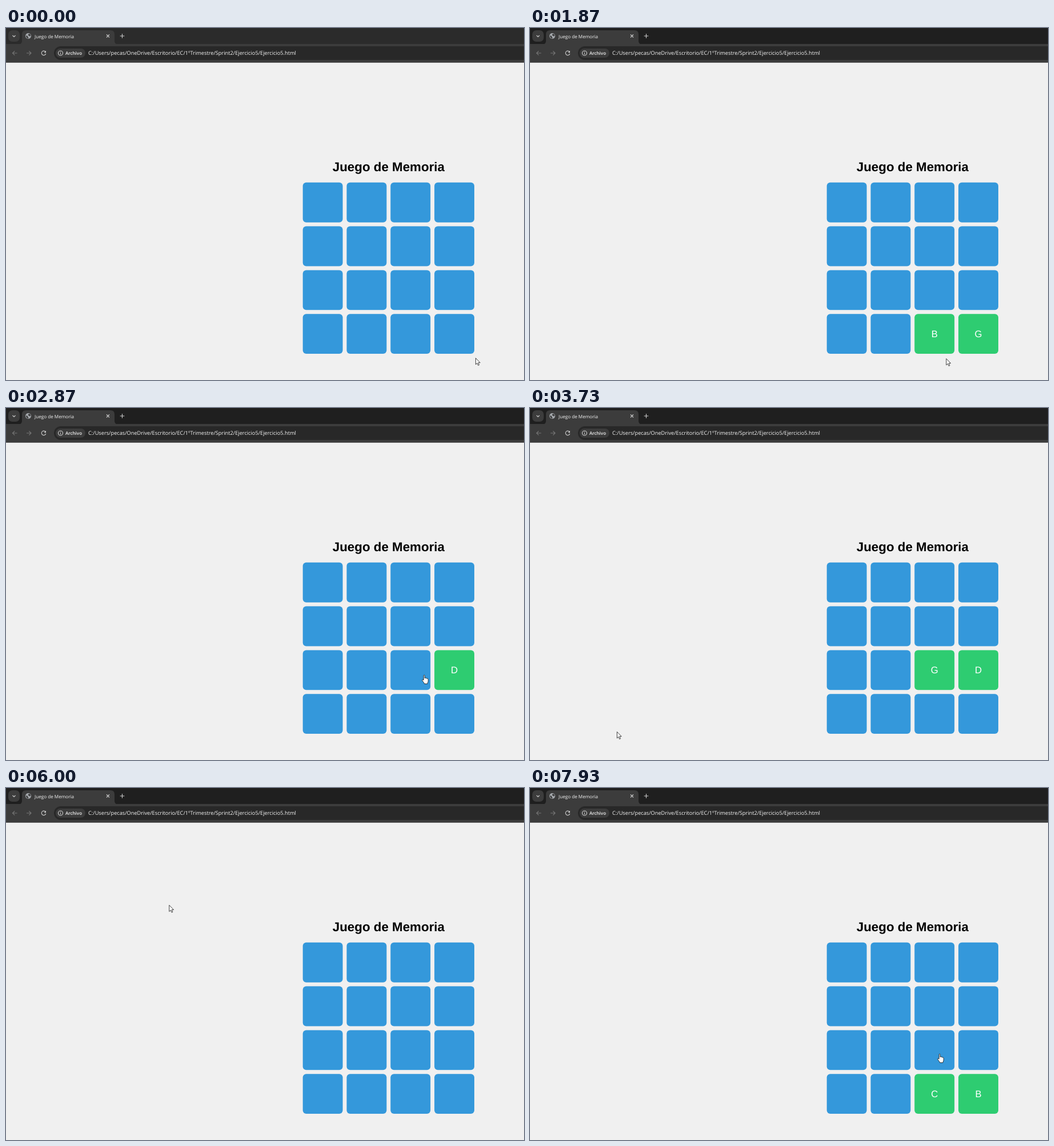
These frames come from a looping animation (907x617 px, 8000 ms). An HTML page:

```html
<!DOCTYPE html>
<html lang="es">
<head>
<meta charset="utf-8">
<title>Juego de Memoria</title>
<style>
  html, body { margin: 0; width: 100%; height: 100%; overflow: hidden; background: #f0f0f0; }
  svg { display: block; width: 907px; height: 617px; text-rendering: geometricPrecision; }
  .ui { font-family: "Open Sans", "Noto Sans", sans-serif; fill: #f4f4f4; }
  .page { font-family: "Liberation Sans", Arial, sans-serif; text-anchor: middle; }
  .line { fill: none; stroke: #d0d0d0; stroke-width: 1.1; }
  .dim { stroke: #777; }
  .pointer { fill: #fff; stroke: #111; stroke-width: .8; stroke-linejoin: round; }
</style>
</head>
<body>
<svg viewBox="0 0 907 617">
  <rect width="907" height="617" fill="#f0f0f0"/>

  <!-- tab strip -->
  <rect id="strip" width="907" height="29" fill="#1f1f1f"/>
  <rect x="4" y="4" width="20" height="20" rx="7" fill="#3c3c3c"/>
  <path class="line" d="M11.5 13l2.5 2.5 2.5-2.5"/>
  <path fill="#3c3c3c" d="M22 28.5q6 0 6-6V11q0-7 7-7H183q7 0 7 7v11.5q0 6 6 6z"/>
  <circle cx="39" cy="14" r="5" fill="#a4a8ac"/>
  <path fill="#3c3c3c" d="M35 13l3.2 1.5.3 1.800 1 1-.6 1.200q-4-1-3.900-5.500zM39.500 10.200l2.500.3 1.300 2.500-1.400 1.700-1.600-1.300-1.700-.5z"/>
  <text class="ui" x="50" y="17.5" font-size="8.150">Juego de Memoria</text>
  <path class="line" d="M176 11.500l5 5m0-5l-5 5M203.500 10.200v7.600M199.700 14h7.600"/>

  <!-- toolbar -->
  <rect y="28" width="907" height="32.8" fill="#3c3c3c"/>
  <path class="line dim" d="M19.500 44h-8m3.700-3.700L11.500 44l3.700 3.700M36 44h8m-3.700-3.700L44 44l-3.700 3.700"/>
  <circle id="hover" cx="66" cy="44" r="12" fill="#505050"/>
  <circle id="ripple" cx="64" cy="48" fill="#fff" opacity=".15"/>
  <path class="line" d="M69 41.500A3.800 3.800 0 1 0 69.700 45"/>
  <path fill="#d0d0d0" d="M70 39.700v3.600h-3.600z"/>
  <rect x="84" y="32" width="840" height="24" rx="12" fill="#282828"/>
  <rect x="87" y="36" width="52" height="16" rx="8" fill="#3c3c3c"/>
  <circle class="line" cx="95.500" cy="44" r="4"/>
  <path class="line" d="M95.500 43.500v2.800M95.500 41.500v1.100"/>
  <text class="ui" x="104" y="47" font-size="8" font-weight="600">Archivo</text>
  <text class="ui" x="144" y="47.300" font-size="9.230">C:/Users/pecas/OneDrive/Escritorio/EC/1ºTrimestre/Sprint2/Ejercicio5/Ejercicio5.html</text>

  <!-- game -->
  <text class="page" x="669.900" y="251.300" font-size="22.350" font-weight="700">Juego de Memoria</text>
  <g id="board" class="page" font-size="16.750"></g>

  <path id="arrow" class="pointer" d="M.4 .6V11.800L3 9.400l1.700 4 1.800-.8-1.700-3.900h3.400z"/>
  <g id="hand">
    <path class="pointer" transform="translate(-5 -.5)"
      d="M3.200 9.600V1.700C3.200.2 5.200.2 5.200 1.700V6C5.400 5.200 7.200 5.200 7.300 6.400 7.700 5.700 9.200 5.800 9.300 7 9.800 6.400 11.200 6.700 11.200 8v3.500C11.200 13 10 14 9.900 16H4.600C4.300 14 1.900 12 .8 10 .2 8.600 2 8 3.200 9.600z"/>
  </g>
</svg>
<script>
  const LOOP = 8000, FPS = 15, PAIR_SHOWN = 1000;
  const LEFT = 519.7, TOP = 270.8, SIZE = 69.9, PITCH = 76.8;
  const $ = id => document.getElementById(id);

  // each move: start, end, and where the pointer comes to rest
  const moves = [
    [0, 133, 791, 562], [467, 800, 711, 544], [1000, 1400, 728, 597],
    [1533, 1867, 728.5, 579], [1867, 2333, 772, 469], [2600, 2867, 733, 468],
    [3067, 3400, 766, 582], [3700, 3733, 152, 567], [3733, 3933, 76, 600],
    [3933, 4533, 124, 9], [4533, 4933, 62, 50], [4933, 5400, 64, 47],
    [5800, 6333, 763, 545], [6867, 7133, 705, 546], [7533, 7933, 718, 466]
  ];

  function pointerAt(t) {
    let x = 822, y = 578;
    for (const [start, end, toX, toY] of moves) {
      const k = Math.min(1, Math.max(0, (t - start) / (end - start)));
      const ease = k * k * (3 - 2 * k);
      x += (toX - x) * ease;
      y += (toY - y) * ease;
    }
    return [x, y];
  }

  // index of the card under a point, or -1
  function cardAt(x, y) {
    const col = Math.floor((x - LEFT) / PITCH), row = Math.floor((y - TOP) / PITCH);
    const inside = (x - LEFT) % PITCH <= SIZE && (y - TOP) % PITCH <= SIZE;
    return inside && col >= 0 && col < 4 && row >= 0 && row < 4 ? row * 4 + col : -1;
  }

  // every second click completes a pair, which then turns back
  const clicks = [467, 933, 2600, 3067, 6733, 7267];
  const flips = clicks.map((from, i) => ({
    from, until: clicks[i | 1] + PAIR_SHOWN,
    card: cardAt(...pointerAt(from)), letter: 'GBDGBC'[i]
  }));

  function add(parent, tag, attrs) {
    const el = document.createElementNS('http://www.w3.org/2000/svg', tag);
    for (const key in attrs) el.setAttribute(key, attrs[key]);
    return parent.appendChild(el);
  }

  const cards = Array.from({ length: 16 }, (_, i) => {
    const x = LEFT + i % 4 * PITCH, y = TOP + (i >> 2) * PITCH;
    return {
      rect: add($('board'), 'rect', { x, y, width: SIZE, height: SIZE, rx: 6 }),
      text: add($('board'), 'text', { x: x + SIZE / 2, y: y + 41, fill: '#fff' })
    };
  });

  const show = (el, on) => el.setAttribute('visibility', on ? 'visible' : 'hidden');

  function draw(t) {
    const between = (a, b) => t + 1 >= a && t + 1 < b;
    const [x, y] = pointerAt(t);

    cards.forEach(({ rect, text }, i) => {
      const flip = flips.find(f => f.card === i && between(f.from, f.until));
      rect.setAttribute('fill', flip ? '#2ecc71' : '#3498db');
      text.textContent = flip ? flip.letter : '';
    });

    const onCard = cardAt(x, y) >= 0;
    show($('hand'), onCard);
    show($('arrow'), !onCard);
    for (const id of ['hand', 'arrow']) $(id).setAttribute('transform', `translate(${x} ${y})`);

    // the window gains focus with the first click
    $('strip').setAttribute('fill', between(0, clicks[0]) ? '#2b2b2b' : '#1f1f1f');
    show($('hover'), Math.hypot(x - 66, y - 44) < 12);
    show($('ripple'), between(5467, 5667));
    $('ripple').setAttribute('r', Math.max(0, Math.min(9.5, 5 + (t - 5467) / 25)));
  }

  // the picture advances in steps of 1/15 s
  function tick() {
    const t = performance.now() % LOOP;
    draw(Math.floor((t + 5) * FPS / 1000) * 1000 / FPS % LOOP);
    requestAnimationFrame(tick);
  }
  tick();
</script>
</body>
</html>
```
